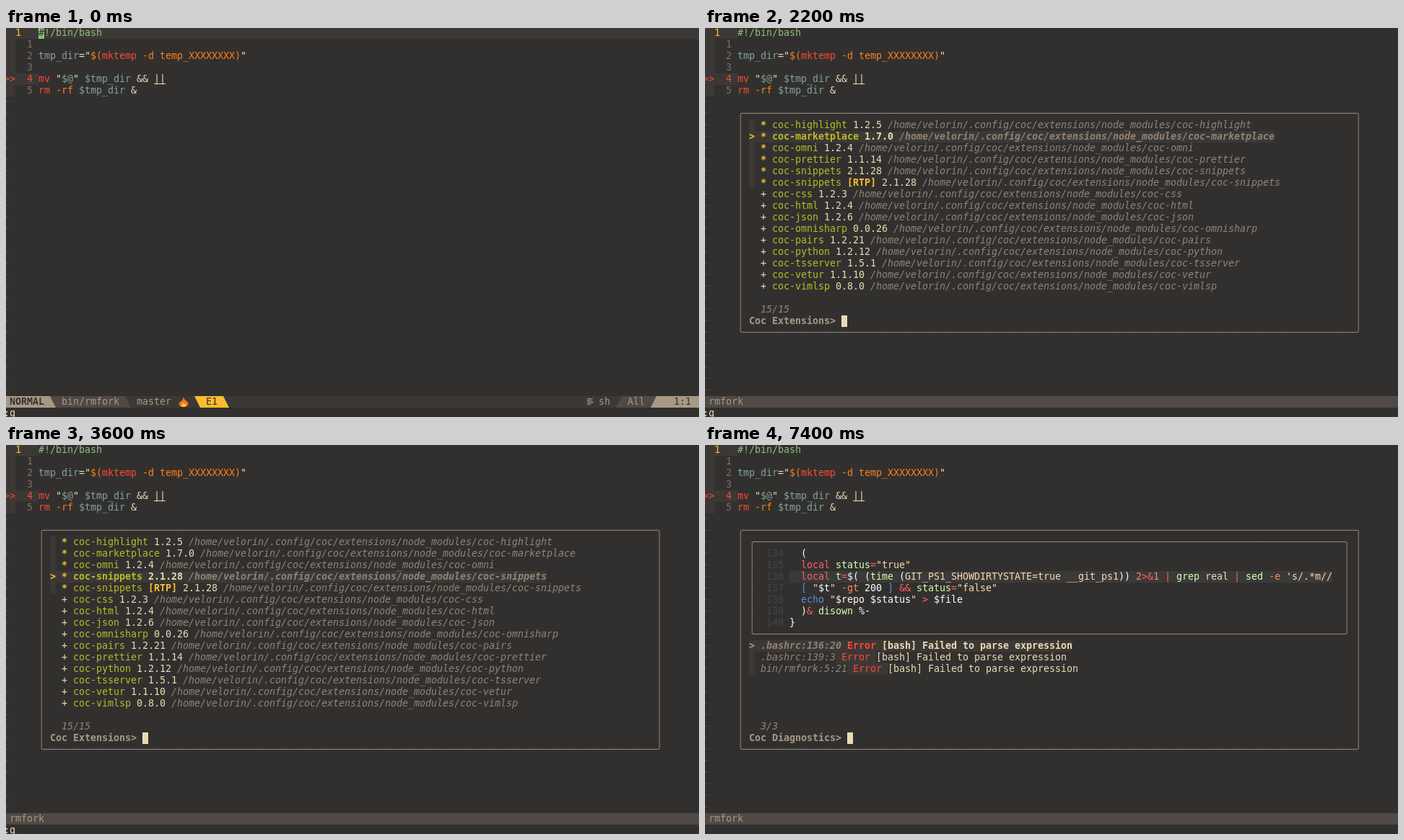
An HTML page with a canvas for the animation above (8 s loop, 960x540 px).

```html
<!DOCTYPE html>
<html lang="en">
<head>
<meta charset="utf-8">
<title>Editor session</title>
<style>
html, body { margin: 0; width: 100%; height: 100%; overflow: hidden; background: #32302f; }
canvas { display: block; width: 960px; height: 540px; }
</style>
</head>
<body>
<canvas id="stage" width="960" height="540"></canvas>
<script>
const ctx = document.getElementById('stage').getContext('2d');
const LOOP = 8000;

const PALETTE = {
  k: '#32302f', d: '#3c3836', s: '#504945', n: '#7c6f64', g: '#928374', l: '#a89984',
  f: '#ebdbb2', r: '#fb4934', y: '#fabd2f', v: '#b8bb26', a: '#8ec07c', b: '#83a598', o: '#fe8019',
  // preview colours
  W: '#ffffff', R: '#ff5f5f', G: '#d7ffaf', C: '#ffd7af', O: '#ff875f', B: '#5f87d7', N: '#444444', H: '#3a3a3a'
};

const X = col => col * 8 - 3;
const Y = row => row * 16 - 1;

function fill(x, y, w, h, color) {
  ctx.fillStyle = PALETTE[color];
  ctx.fillRect(x, y, w, h);
}

function cells(row, col, count, color) {
  fill(X(col), Y(row), count * 8, 16, color);
}

function poly(color, ...points) {
  ctx.fillStyle = PALETTE[color];
  ctx.beginPath();
  for (let i = 0; i < points.length; i += 2) ctx.lineTo(points[i], points[i + 1]);
  ctx.fill();
}

// Styles are a colour letter plus optional * (bold), / (italic), _ (underline).
function text(row, col, ...parts) {
  for (let i = 0; i < parts.length; i += 2) {
    const style = parts[i], run = parts[i + 1];
    ctx.font = (style.includes('/') ? 'italic ' : '') + (style.includes('*') ? 'bold ' : '') +
      '13.333px "DejaVu Sans Mono", monospace';
    ctx.fillStyle = PALETTE[style[0]];
    if (style.includes('_')) ctx.fillRect(X(col), Y(row) + 14, run.length * 8, 1);
    for (const ch of run) {
      if (ch !== ' ') ctx.fillText(ch, X(col), Y(row) + 12);
      col++;
    }
  }
  return col;
}

function frame(left, top, right, bottom) {
  const edge = '─'.repeat(right - left - 1);
  text(top, left, 'g', '╭' + edge + '╮');
  for (let row = top + 1; row < bottom; row++) {
    text(row, left, 'g', '│');
    text(row, right, 'g', '│');
  }
  text(bottom, left, 'g', '╰' + edge + '╯');
}

function buffer(focused) {
  fill(0, 0, 960, 540, 'k');
  fill(0, 0, focused ? 960 : 45, 15, 'd');
  fill(0, 15, 13, 80, 'd');
  cells(4, 0, 6, 'd');
  text(0, 2, 'y', '1');
  for (let row = 1; row < 6; row++) text(row, 4, row === 4 ? 'r' : 'n', String(row));
  for (let row = 6; row < 32; row++) text(row, 0, 's', '~');
  text(4, 0, 'r', '>>');

  text(0, 6, 'a', '#!/bin/bash');
  text(2, 6, 'b', 'tmp_dir', 'f', '="', 'o', '$(', 'r', 'mktemp', 'o', ' -d temp_XXXXXXXX)', 'f', '"');
  text(4, 6, 'r', 'mv', 'f', ' "', 'b', '$@', 'f', '"', 'b', ' $tmp_dir', 'f', ' && ', 'f_', '||');
  text(5, 6, 'r', 'rm', 'o', ' -rf', 'b', ' $tmp_dir', 'f', ' &');
  if (focused) {
    fill(45, 0, 8, 15, 'a');
    text(0, 6, 'k', '#');
  }
}

function flame(x, y) {
  const drop = (color, w, h) => {
    ctx.fillStyle = color;
    ctx.beginPath();
    ctx.moveTo(x - w * .1, y - h);
    ctx.bezierCurveTo(x + w * .2, y - h * .6, x + w, y - h * .6, x + w, y - h * .3);
    ctx.bezierCurveTo(x + w, y + h * .1, x - w, y + h * .1, x - w, y - h * .3);
    ctx.bezierCurveTo(x - w, y - h * .6, x, y - h * .5, x - w * .1, y - h);
    ctx.fill();
  };
  drop('#f4711f', 6.5, 14);
  drop('#fcc934', 3.5, 7);
}

function statusLine() {
  fill(0, 511, 960, 16, 'd');
  fill(0, 511, 165, 16, 's');
  poly('s', 165, 511, 173, 527, 165, 527);
  poly('l', 0, 511, 61, 511, 69, 527, 0, 527);
  poly('y', 261, 511, 301, 511, 309, 527, 269, 527);
  poly('s', 853, 511, 901, 511, 901, 527, 845, 527);
  poly('l', 901, 511, 960, 511, 960, 527, 893, 527);
  text(32, 1, 'k*', 'NORMAL');
  text(32, 10, 'l', 'bin/rmfork');
  text(32, 23, 'l', 'master');
  flame(246, 526);
  text(32, 35, 'k', 'E1');
  [8, 6, 9, 8, 5].forEach((w, i) => fill(805, 514 + i * 2, w, 1, 'l'));
  text(32, 103, 'l', 'sh');
  text(32, 108, 'l', 'All');
  text(32, 116, 'k', '1:1');
}

function editor(command, keys) {
  buffer(true);
  statusLine();
  text(33, 0, 'f', command);
  text(33, 110, 'f', keys);
}

function popup(command) {
  buffer(false);
  fill(0, 511, 960, 16, 's');
  text(32, 1, 'l', 'rmfork');
  text(33, 0, 'f', command);
  frame(6, 7, 113, 26);
}

function emptyPopup(command) {
  popup(command);
  cells(8, 8, 1, 'f');
}

function prompt(count, label) {
  text(24, 10, 'g/', count);
  cells(25, text(25, 8, 'l*', label) + 1, 1, 'f');
}

const EXTENSIONS = [
  'highlight 1.2.5', 'marketplace 1.7.0', 'omni 1.2.4', 'prettier 1.1.14', 'snippets 2.1.28',
  'snippets [RTP] 2.1.28', 'css 1.2.3', 'html 1.2.4', 'json 1.2.6', 'omnisharp 0.0.26',
  'pairs 1.2.21', 'python 1.2.12', 'tsserver 1.5.1', 'vetur 1.1.10', 'vimlsp 0.8.0'
];
// Once switched off, "prettier" is listed after "pairs".
const TOGGLED = EXTENSIONS.slice();
TOGGLED.splice(10, 0, ...TOGGLED.splice(3, 1));

function extensions(list, active, selected) {
  popup(':q');
  list.forEach((entry, i) => {
    const words = entry.split(' ');
    const name = 'coc-' + words[0], version = words[words.length - 1];
    const tag = words.length > 2 ? ' ' + words[1] : '';
    const path = '/home/velorin/.config/coc/extensions/node_modules/' + name;
    const row = 8 + i, on = i === selected, bold = on ? '*' : '';
    if (i < active) cells(row, 8, 1, 'd');
    if (on) {
      cells(row, 8, 6 + name.length + version.length + path.length, 'd');
      text(row, 8, 'y*', '>');
    }
    text(row, 10, i < active ? 'y*' : 'f', i < active ? '* ' : '+ ', 'v' + bold, name, 'y*', tag,
      'f' + bold, ' ' + version + ' ', 'g/' + bold + (on && i === 0 ? '_' : ''), path);
  });
  prompt('15/15', 'Coc Extensions>');
}

// "moved" is one splice: the entry leaves index 3 and lands at index 10.
function diagnostics() {
  popup('');
  frame(8, 8, 111, 16);
  for (let i = 0; i < 7; i++) text(9 + i, 11, 'N', String(134 + i));
  cells(11, 15, 94, 'H');
  text(9, 17, 'W', '(');
  text(10, 17, 'R', 'local ', 'G', 'status', 'R', '=', 'C', '"true"');
  text(11, 17, 'R', 'local ', 'G', 't', 'R', '=', 'W', '$( (', 'G', 'time', 'W', ' (',
    'C', 'GIT_PS1_SHOWDIRTYSTATE=true __git_ps1', 'W', ')) ', 'O', '2', 'R', '>&', 'O', '1',
    'R', ' | ', 'G', 'grep', 'C', ' real', 'R', ' | ', 'G', 'sed', 'O', ' -e', 'C', " 's/.*m//");
  text(12, 17, 'B', '[', 'C', ' "', 'W', '$t', 'C', '"', 'O', ' -gt', 'W', ' 200', 'B', ' ]',
    'R', ' && ', 'G', 'status', 'R', '=', 'C', '"false"');
  text(13, 17, 'B', 'echo', 'C', ' "', 'W', '$repo $status', 'C', '"', 'R', ' > ', 'W', '$file');
  text(14, 17, 'W', ')', 'R', '& ', 'G', 'disown', 'W', ' %-');
  text(15, 15, 'W', '}');

  ['.bashrc:136:20', '.bashrc:139:3', 'bin/rmfork:5:21'].forEach((place, i) => {
    const row = 17 + i, bold = i ? '' : '*';
    cells(row, 8, i ? 1 : 56, 'd');
    cells(row, 10 + place.length, 7, 'd');
    text(row, 10, 'g/' + bold, place, 'r' + bold, ' Error ', 'f' + bold, '[bash] Failed to parse expression');
  });
  text(17, 8, 'l*', '>');
  prompt('3/3', 'Coc Diagnostics>');
}

const SCENES = [
  [0, () => editor(':q', '')],
  [1000, () => editor(':q', '<20>')],
  [1400, () => emptyPopup(':q')],
  [1500, () => extensions(EXTENSIONS, 6, 0)],
  [2200, () => extensions(EXTENSIONS, 6, 1)],
  [2400, () => extensions(EXTENSIONS, 6, 2)],
  [2600, () => extensions(EXTENSIONS, 6, 3)],
  [3500, () => emptyPopup(':q')],
  [3600, () => extensions(TOGGLED, 5, 3)],
  [5000, () => editor('', '')],
  [7000, () => editor('', '<20>')],
  [7300, () => emptyPopup('')],
  [7400, diagnostics]
];

const start = performance.now();
let shown = null;
function tick() {
  const t = (performance.now() - start) % LOOP;
  const scene = SCENES.findLast(([at]) => at <= t);
  if (scene !== shown) {
    shown = scene;
    scene[1]();
  }
  requestAnimationFrame(tick);
}
tick();
</script>
</body>
</html>
```
